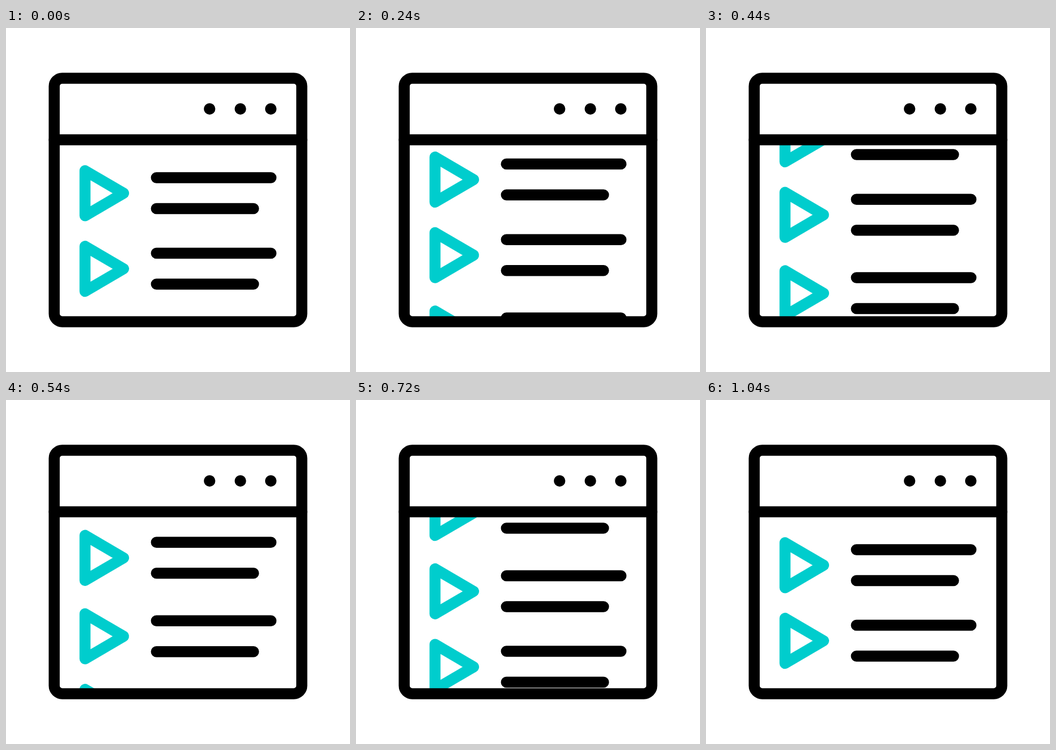
An HTML page for the animation above (1200 ms loop, 640 by 640 pixels).

```html
<!DOCTYPE html>
<html lang="en">
<head>
<meta charset="utf-8">
<title>Scrolling playlist</title>
<style>
  html, body { margin: 0; height: 100%; overflow: hidden; background: #fff; }
  svg { display: block; width: 100%; height: 100%; }
</style>
</head>
<body>
<svg viewBox="0 0 640 640" fill="none" stroke="#000" stroke-width="20.5" stroke-linecap="round" stroke-linejoin="round">
  <defs>
    <clipPath id="pane"><path d="M90 208H550V546H90Z"/></clipPath>
    <g id="item">
      <path stroke="#00cdcd" d="M147 265.5V349.3L218.7 307.4Z"/>
      <path d="M279.8 278.4H493M279.8 335.9H460.5"/>
    </g>
    <g id="pair">
      <use href="#item"/>
      <use href="#item" y="140.6"/>
    </g>
  </defs>
  <g clip-path="url(#pane)">
    <g id="list">
      <use href="#pair"/>
      <use href="#pair" y="286.5"/>
    </g>
  </g>
  <rect x="89.7" y="93.4" width="460.6" height="453" rx="15"/>
  <path d="M89.7 208.1H550.3"/>
  <g fill="#000" stroke="none">
    <circle cx="378.8" cy="150.6" r="10.6"/>
    <circle cx="436.1" cy="150.6" r="10.6"/>
    <circle cx="492.7" cy="150.6" r="10.6"/>
  </g>
</svg>
<script>
  const LOOP = 1200, SCROLL = 1040, STEP = 20, DISTANCE = 286.5;
  const list = document.getElementById('list');
  const start = performance.now();

  // Equivalent to cubic-bezier(.5, 0, .5, 1), solved by bisection
  function ease(x) {
    let lo = 0, hi = 1;
    for (let i = 0; i < 24; i++) {
      const s = (lo + hi) / 2;
      if (1.5 * s - 1.5 * s * s + s * s * s < x) lo = s; else hi = s;
    }
    return lo * lo * (3 - 2 * lo);
  }

  function draw() {
    const t = Math.max(0, performance.now() - start) % LOOP;
    const time = Math.floor(t / STEP) * STEP;
    const shift = time < SCROLL ? DISTANCE * ease(time / SCROLL) : 0;
    list.setAttribute('transform', `translate(0 ${-shift.toFixed(3)})`);
    requestAnimationFrame(draw);
  }
  draw();
</script>
</body>
</html>
```
